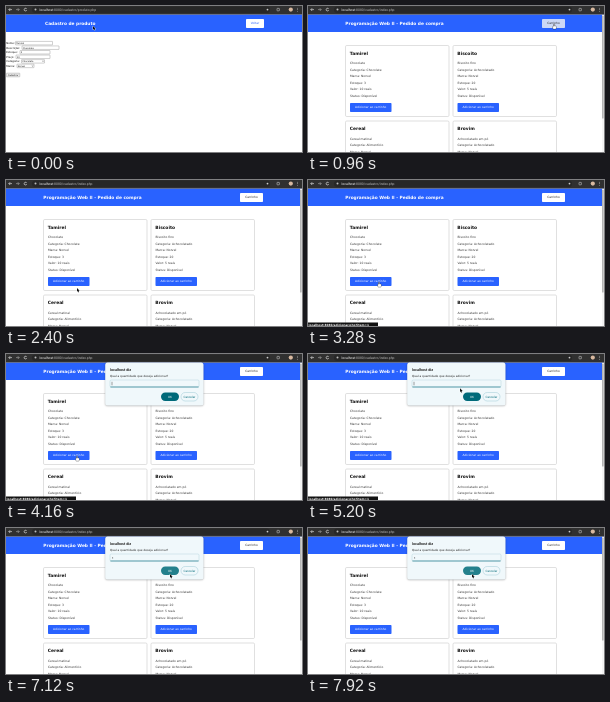
An HTML page with a canvas that plays this animation: 296x146 px, repeating every 8000 ms.

```html
<!DOCTYPE html>
<html lang="pt-BR">
<head>
<meta charset="utf-8">
<title>Pedido de compra</title>
<style>
html, body { margin: 0; width: 100%; height: 100%; overflow: hidden; background: #fff; }
canvas { display: block; width: 296px; height: 146px; }
</style>
</head>
<body>
<canvas id="stage"></canvas>
<script>
const LOOP = 8000, STEP = 80, W = 296, H = 146;
const canvas = document.getElementById('stage');
const ctx = canvas.getContext('2d');
const dpr = window.devicePixelRatio || 1;
canvas.width = W * dpr;
canvas.height = H * dpr;

const SANS = '"DejaVu Sans", sans-serif';
const UI = 'Roboto, "Open Sans", sans-serif';
const BLUE = '#2962ff', TEAL = '#006a7a';

// Pointer path: time, x, y of the tip
const path = [
  [0, 87, 20], [160, 87, 20], [720, 246, 18], [1520, 246, 18], [1760, 238, 23],
  [2320, 71, 108], [2720, 71, 108], [3040, 71, 102], [4480, 71, 102],
  [4960, 163, 47], [5280, 150, 32], [5680, 139, 27], [6240, 139, 27],
  [6880, 164, 46], [8000, 164, 46]
];

const cards = [
  ['Tamirel', ['Chocolate', 'Categoria: Chocolate', 'Marca: Norvel', 'Estoque: 3', 'Valor: 10 reais', 'Status: Disponível']],
  ['Biscoito', ['Biscoito fino', 'Categoria: Achocolatado', 'Marca: Norvel', 'Estoque: 20', 'Valor: 5 reais', 'Status: Disponível']],
  ['Cereal', ['Cereal matinal', 'Categoria: Alimentício', 'Marca: Norvel']],
  ['Brovim', ['Achocolatado em pó', 'Categoria: Achocolatado', 'Marca: Norvel']]
];

function box(x, y, w, h, r, fill, stroke, line = 0.5) {
  ctx.beginPath();
  ctx.roundRect(x, y, w, h, r);
  if (fill) { ctx.fillStyle = fill; ctx.fill(); }
  if (stroke) { ctx.strokeStyle = stroke; ctx.lineWidth = line; ctx.stroke(); }
}

function text(s, x, y, size, color, bold, align = 'left', font = SANS) {
  ctx.font = `${bold ? 'bold ' : ''}${size}px ${font}`;
  ctx.textAlign = align;
  ctx.fillStyle = color;
  ctx.fillText(s, x, y);
}

function lines(color, width, ...strokes) {
  ctx.beginPath();
  for (const pts of strokes) pts.forEach(([x, y], i) => i ? ctx.lineTo(x, y) : ctx.moveTo(x, y));
  ctx.strokeStyle = color;
  ctx.lineWidth = width;
  ctx.stroke();
}

function dot(x, y, r, color) {
  ctx.beginPath();
  ctx.arc(x, y, r, 0, 7);
  ctx.fillStyle = color;
  ctx.fill();
}

function toolbar(page) {
  box(0, 0, W, 8.5, 0, '#303030');
  box(26, 0.6, 238, 6.4, 3.2, '#272727');
  lines('#eee', 0.6, [[6, 3.6], [2.8, 3.6]], [[4.2, 2.2], [2.8, 3.6], [4.2, 5]]);
  lines('#aaa', 0.6, [[10, 3.6], [13.2, 3.6]], [[11.8, 2.2], [13.2, 3.6], [11.8, 5]]);
  ctx.beginPath();
  ctx.arc(19.5, 3.6, 1.4, 0.4, 5.8);
  ctx.strokeStyle = '#eee';
  ctx.stroke();
  dot(29.5, 3.6, 1, '#bbb');
  text('localhost', 33.5, 4.8, 3.4, '#fff', false, 'left', UI);
  text(page, 47.3, 4.8, 3.4, '#bbb', false, 'left', UI);
  dot(261.5, 3.6, 0.9, '#ccc');
  box(271, 2.4, 2.4, 2.4, 0.4, null, '#ddd');
  dot(284.8, 3.6, 2.1, '#d9b9a0');
  for (let i = 0; i < 3; i++) dot(291.5, 2.2 + i * 1.5, 0.4, '#eee');
}

function header(title, x, label, bx, bw, color, hover) {
  box(0, 8.5, W, 17.5, 0, BLUE);
  text(title, x, 18.9, 4.35, '#fff', true);
  box(bx, 13, bw, 9, 0.8, hover ? '#ccd8f6' : '#fff');
  text(label, bx + bw / 2, 18.4, 2.95, color, false, 'center');
}

function formPage(loaded) {
  header('Cadastro de produto', 39, 'Voltar', 240, 18, BLUE, false);
  if (!loaded) return;
  const rows = [['Nome:', 9.5, 37, 'Tamirel'], ['Descrição:', 16, 37, 'Chocolate'],
    ['Estoque:', 14, 30, '3'], ['Preço:', 10, 34, '10'],
    ['Categoria:', 15.5, 23, 'Chocolate'], ['Marca:', 11, 17, 'Norvel']];
  rows.forEach(([label, x, w, value], i) => {
    const y = 38.2 + i * 4.55;
    text(label, 0.3, y, 2.6, '#000');
    box(x, y - 2.8, w, 3.5, 0.3, '#fff', '#767676', 0.35);
    text(value, x + 0.8, y - 0.1, 2.2, '#000');
    if (i > 3) lines('#000', 0.4, [[x + w - 2.2, y - 1.4], [x + w - 1.5, y - 0.8], [x + w - 0.8, y - 1.4]]);
  });
  box(0.3, 67.2, 13.5, 3.6, 0.4, '#efefef', '#767676', 0.35);
  text('Cadastrar', 7, 69.9, 2.2, '#000', false, 'center');
}

function shopPage(t) {
  header('Programação Web II - Pedido de compra', 37.3, 'Carrinho', 234, 23, '#222', t < 1680);
  cards.forEach(([name, info], i) => {
    const x = 37.5 + i % 2 * 107.5, y = i < 2 ? 39.5 : 115;
    box(x, y, 103.5, 71, 1.2, '#fff', '#ccc', 0.6);
    text(name, x + 4.3, y + 9.1, 4.4, '#111', true);
    info.forEach((s, k) => text(s, x + 4.5, y + 18.5 + k * 6.5, 3, '#333'));
    if (i > 1) return;
    box(x + 4.5, 97, 41.5, 9, 0.8, BLUE);
    text('Adicionar ao carrinho', x + 25.2, 102.4, 2.95, '#fff', false, 'center');
  });
  box(294, 8.5, 2, H, 0, '#f4f4f4');
  box(294.4, 9.5, 1, 103, 0.5, '#8c8c8c');
}

function status(s, w) {
  box(0, 142.5, w, 4, 0, '#111');
  text(s, 0.5, 145.6, 2.9, '#fff', true);
}

function dialog(t) {
  ctx.save();
  ctx.shadowColor = '#0005';
  ctx.shadowBlur = 2 * dpr;
  ctx.shadowOffsetY = 0.5 * dpr;
  box(99.2, 8.5, 98.3, 43, 2.5, '#f0f8fb');
  ctx.restore();
  text('localhost diz', 104, 17.2, 3.7, '#1f1f1f', true, 'left', UI);
  text('Qual a quantidade que deseja adicionar?', 104, 23, 2.85, '#222');
  box(104, 26, 89, 7, 1.2, '#f0f8fb', '#9cc9d4', 0.35);
  lines(TEAL, 0.6, [[104.4, 33], [192.6, 33]]);
  if (t >= 6320) text('1', 106, 30.6, 2.9, '#111', false, 'left', UI);
  else if (t % 1000 < 500) lines('#111', 0.4, [[106, 27.8], [106, 31.3]]);
  const hover = t >= 6720 || (t > 4880 && t < 5120);
  box(155, 38.5, 18, 8.5, 4.2, hover ? '#23808c' : TEAL);
  text('OK', 164, 43.8, 3, '#fff', false, 'center', UI);
  box(175, 38.5, 17, 8.5, 4.2, '#f0f8fb', '#9cc9d4', 0.5);
  text('Cancelar', 183.4, 43.8, 3, TEAL, false, 'center', UI);
}

function pointerAt(t) {
  const i = path.findIndex(p => p[0] > t);
  const [t0, x0, y0] = path[i - 1], [t1, x1, y1] = path[i];
  const u = (t - t0) / (t1 - t0), e = u * u * (3 - 2 * u);
  return [x0 + (x1 - x0) * e, y0 + (y1 - y0) * e];
}

function beam(x, y) {
  lines('#222', 0.5, [[x - 1, y - 2], [x + 1, y - 2]], [[x, y - 2], [x, y + 2.5]], [[x - 1, y + 2.5], [x + 1, y + 2.5]]);
}

function hand(x, y) {
  box(x - 1.3, y + 2, 3.6, 3, 1, '#fff', '#111', 0.4);
  box(x - 0.5, y, 1.1, 3.6, 0.5, '#fff', '#111', 0.4);
  box(x - 0.9, y + 2.3, 2.8, 2.3, 0.6, '#fff');
}

function arrow(x, y) {
  ctx.beginPath();
  [[0, 0], [0, 3.8], [0.9, 3], [1.5, 4.4], [2.1, 4.1], [1.5, 2.8], [2.7, 2.7]]
    .forEach(([dx, dy]) => ctx.lineTo(x + dx, y + dy));
  ctx.closePath();
  ctx.fillStyle = '#111';
  ctx.strokeStyle = '#fff';
  ctx.lineWidth = 0.6;
  ctx.stroke();
  ctx.fill();
}

function pointer(t) {
  const overLink = (t >= 960 && t < 1680) || (t >= 2880 && t < 4560);
  const overInput = t >= 5520 && t < 6320;
  const shape = overLink ? hand : overInput ? beam : arrow;
  shape(...pointerAt(t));
}

function draw(t) {
  ctx.setTransform(dpr, 0, 0, dpr, 0, 0);
  ctx.textRendering = 'geometricPrecision';
  box(0, 0, W, H, 0, '#fff');
  if (t < 960) formPage(t < 880);
  else shopPage(t);
  toolbar(t < 960 ? ':8080/cadastro/produto.php' : ':8080/cadastro/index.php');
  if (t >= 1120 && t < 1920) status('localhost:8080/carrinho', 46);
  if (t >= 2960 && t < 5440) status('localhost:8080/adicionar.php?item=1', 70);
  if (t >= 3840) dialog(t);
  pointer(t);
}

function tick(now) {
  draw(Math.floor(now % LOOP / STEP) * STEP);
  requestAnimationFrame(tick);
}
requestAnimationFrame(tick);
</script>
</body>
</html>
```
